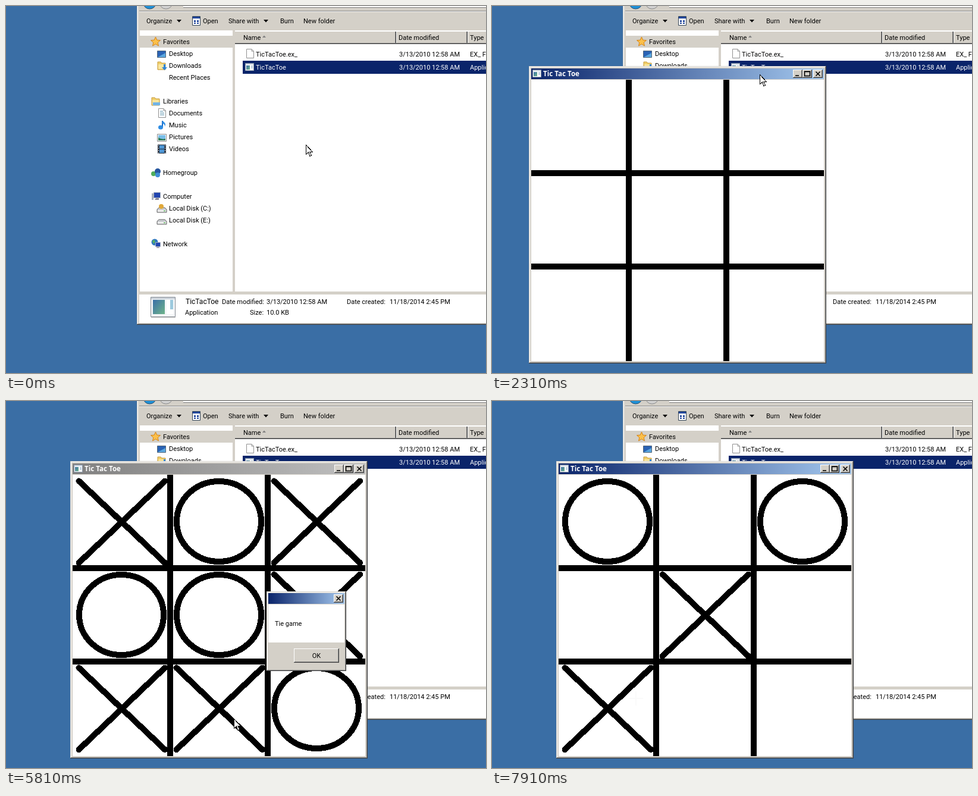
Animation, 807 px wide and 617 px high, one loop 8000 ms. Source, as an HTML page:

```html
<!DOCTYPE html>
<html lang="en">
<head>
<meta charset="utf-8">
<title>Noughts and crosses</title>
<style>
  html, body { margin: 0; width: 100%; height: 100%; overflow: hidden; background: #3a6ea5; }
  svg { display: block; width: 807px; height: 617px; }
  text { font: 11px Roboto, "Open Sans", sans-serif; white-space: pre; }
  .caption { font: bold 11.6px "Open Sans", "Noto Sans", sans-serif; fill: #fff; }
  .sharp { shape-rendering: crispEdges; }
  .mark { fill: none; stroke: #000; stroke-width: 10; stroke-linecap: round; shape-rendering: crispEdges; }
</style>
</head>
<body>
<svg viewBox="0 0 807 617">
  <defs>
    <linearGradient id="active"><stop stop-color="#0a246a"/><stop offset="1" stop-color="#a6caf0"/></linearGradient>
    <linearGradient id="inactive"><stop stop-color="#808080"/><stop offset="1" stop-color="#c0c0c0"/></linearGradient>
    <linearGradient id="pane" x2="1" y2="1"><stop stop-color="#3b6fa8"/><stop offset="1" stop-color="#6fb58a"/></linearGradient>
    <g id="app">
      <path d="M0 0H15V13H0Z" fill="#8a97a8"/><path d="M1 3H14V12H1Z" fill="#fff"/>
      <path d="M1 1H14V3H1Z" fill="#d5dde8"/><path d="M2 4H8V11H2Z" fill="url(#pane)"/>
      <path d="M10 4H13V9H10Z" fill="#c3d3e2"/>
    </g>
    <g id="page">
      <path d="M.5 .5H9L12.5 4V15.5H.5Z" fill="#fff" stroke="#909090"/><path d="M9 .5V4H12.5" fill="none" stroke="#909090"/>
    </g>
    <g id="screen">
      <path d="M.5 .5H14.5V11.5H.5Z" fill="#2a62b4" stroke="#567"/><path d="M1 11L14 4V11Z" fill="#5aa7df"/>
    </g>
    <g id="folder"><path d="M0 1H5L7 3H13V14H0Z" fill="#f0cf6a" stroke="#c79a3c"/><path d="M1 5H12V13H1Z" fill="#fae6a0"/></g>
    <g id="drive"><path d="M0 5L3 2H13L16 5V10H0Z" fill="#c9ccd0" stroke="#666"/><path d="M1 6H15V9H1Z" fill="#eee"/><path d="M11 7H14V8H11Z" fill="#3a3"/></g>
  </defs>

  <g id="explorer">
    <g class="sharp">
      <path d="M220 0H807V536H220Z" fill="#d4d0c8"/>
      <path d="M221 0H222V534H221Z" fill="#fff"/>
      <path d="M221 534H807V535H221Z" fill="#808080"/>
      <path d="M220 535H807V536H220Z" fill="#404040"/>
      <path d="M298 0H807V2H298Z" fill="#fff"/><path d="M298 2H807V3H298Z" fill="#808080"/>
      <path d="M224 8H807V9H224Z" fill="#808080"/><path d="M224 9H807V10H224Z" fill="#fff"/>
      <path d="M225 41H381V480H225ZM385 41H807V480H385ZM224 485H807V533H224Z" fill="#fff"/>
      <path d="M225 50H381V70H225ZM385 42H807V63H385Z" fill="#d4d0c8"/>
      <path d="M385 63H807V64H385ZM655 42H656V63H655ZM775 42H776V63H775Z" fill="#404040"/>
      <path d="M385 62H807V63H385ZM654 43H655V62H654ZM774 43H775V62H774Z" fill="#808080"/>
      <path d="M656 42H657V62H656ZM776 42H777V62H776ZM385 42H807V43H385Z" fill="#fff"/>
      <path d="M398 92H807V114H398Z" fill="#0a246a"/>
    </g>
    <g>
      <circle cx="241.500" cy="-6" r="11" fill="#1d8fd6" stroke="#35526f"/>
      <circle cx="269" cy="-6" r="11" fill="#d0d0d0" stroke="#8a8a8a"/>
      <path d="M287 23H295L291 27.500ZM433 23H441L437 27.500Z"/>
      <path d="M431 53L434 49.500L437 53Z" fill="#808080"/>
      <path d="M313.500 17.500H326.500V32.500H313.500Z" fill="#fff" stroke="#345"/>
      <path d="M314 18H326V21H314ZM316 24H319V27H316ZM321 24H324V27H321ZM316 28H319V30H316ZM321 28H324V30H321Z" fill="#24489c"/>
      <path d="M251.500 52L253.800 57.200L259.500 57.700L255.200 61.500L256.500 67L251.500 64L246.500 67L247.800 61.500L243.500 57.700L249.200 57.200Z" fill="#fbc04a" stroke="#d48216"/>
    </g>
    <use href="#screen" x="254" y="75"/>
    <use href="#folder" x="255" y="93"/>
    <path d="M265 98V103H262L266.500 108L271 103H268V98Z" fill="#2d85d8"/>
    <use href="#folder" x="245" y="153"/><path d="M247 162H259V167H247Z" fill="#72b4e6"/>
    <use href="#page" x="256" y="172"/><path d="M259 177H264M259 180H266M259 183H266" stroke="#4a88a5"/>
    <path d="M263 193V204" stroke="#1668c4" stroke-width="2"/><path d="M263 193Q270 197 267 203Q267 198 263 198Z" fill="#2f8de4"/><ellipse cx="260" cy="204" rx="4" ry="3.500" fill="#2f8de4"/>
    <path d="M254.500 215.500H269.500V227.500H254.500Z" fill="#fff" stroke="#888"/><path d="M256 217H268V226H256Z" fill="#79bde8"/><path d="M256 226V221Q262 225 268 223V226Z" fill="#2e7a57"/>
    <path d="M255 233H269V248H255Z" fill="#222c3c"/><path d="M258 234H266V240H258ZM258 241H266V247H258Z" fill="#4f96d4"/><path d="M256.500 234V248M267.500 234V248" stroke="#ddd" stroke-dasharray="2 2"/>
    <circle cx="248" cy="282" r="4" fill="#4fae5c"/><circle cx="255" cy="278" r="5" fill="#27579f"/><circle cx="255" cy="284" r="4" fill="#3f8ed8"/>
    <path d="M245 315H248V326H245Z" fill="#a8b0bd"/><path d="M248.500 313.500H259.500V322.500H248.500Z" fill="#2145b0" stroke="#a8b0bd"/><path d="M252 323H257V326H250Z" fill="#889"/>
    <use href="#drive" x="254" y="337"/><circle cx="261" cy="337" r="4" fill="#e0a83a"/>
    <use href="#drive" x="254" y="357"/>
    <circle cx="250" cy="397" r="5.500" fill="#2f78c0"/><path d="M246 395Q249 391 251 396L248 400Z" fill="#55b060"/><path d="M251.500 397.500H259.500V404.500H251.500Z" fill="#2145b0" stroke="#a8b0bd"/><path d="M253 406H258" stroke="#556"/>
    <use href="#page" x="404" y="72"/>
    <use href="#app" x="402" y="96"/>
    <g><path d="M243.500 489.500H284.500V522.500H243.500Z" fill="#f4f6f8" stroke="#858b92"/><path d="M244 490H284V493H244Z" fill="#cbd2da"/><path d="M247 494H267V518H247Z" fill="url(#pane)"/><path d="M270 494H281V518H270Z" fill="#fff"/><path d="M276 494H281V510H276Z" fill="#9cc9dd"/><path d="M244 523.500H285" stroke="#bbb"/></g>
  </g>

  <g id="game"></g>
  <g id="dialog"></g>
  <path id="arrow" class="sharp" d="M.5 .5V16.500L4.500 13L7 19.500L9.500 18.500L7 12.500H11.500Z" fill="#fff" stroke="#000"/>
  <path id="cross" class="sharp" d="M-12 0H12M0 -12V12" stroke="#fafafa" stroke-width="2"/>
</svg>
<script>
const LOOP = 8000, TICK = 70;
const $ = id => document.getElementById(id);

function add(parent, name, attrs, text) {
  const node = document.createElementNS('http://www.w3.org/2000/svg', name);
  for (const key in attrs) node.setAttribute(key, attrs[key]);
  if (text) node.textContent = text;
  return parent.appendChild(node);
}
const box = (parent, x, y, width, height, fill) =>
  add(parent, 'rect', { x, y, width, height, fill, class: 'sharp' });
const label = (parent, x, y, text, attrs) => add(parent, 'text', { x, y, ...attrs }, text);

const labels = [
  [236, 29, 'Organize'], [331, 29, 'Open'], [374, 29, 'Share with'], [461, 29, 'Burn'], [500, 29, 'New folder'],
  [264, 64, 'Favorites'], [274, 84, 'Desktop'], [274, 104, 'Downloads'], [274, 124, 'Recent Places'],
  [264, 164, 'Libraries'], [274, 184, 'Documents'], [274, 204, 'Music'], [274, 224, 'Pictures'], [274, 244, 'Videos'],
  [264, 284, 'Homegroup'], [264, 324, 'Computer'], [274, 344, 'Local Disk (C:)'], [274, 364, 'Local Disk (E:)'],
  [264, 404, 'Network'], [399, 57, 'Name'], [660, 57, 'Date modified'], [780, 57, 'Type'],
  [420, 85, 'TicTacToe.ex_'], [661, 85, '3/13/2010 12:58 AM'], [780, 85, 'EX_ File'],
  [363, 501, 'Date modified:'], [438, 501, '3/13/2010 12:58 AM'],
  [573, 501, 'Date created:'], [645, 501, '11/18/2014 2:45 PM'],
  [301, 519, 'Application'], [410, 519, 'Size:'], [438, 519, '10.0 KB']
];
const explorer = $('explorer');
labels.forEach(l => label(explorer, ...l));
[[420, 107, 'TicTacToe'], [661, 107, '3/13/2010 12:58 AM'], [780, 107, 'Application']]
  .forEach(l => label(explorer, ...l, { fill: '#fff' }));
label(explorer, 302, 501, 'TicTacToe', { style: 'font-size:12px' });

// Raised edge: dark outside right and bottom, light inside left and top.
function raised(parent, x, y, w, h, light = 0) {
  box(parent, x, y, w, h, '#404040');
  box(parent, x, y, w - 1, h - 1, light ? '#fff' : '#d4d0c8');
  box(parent, x + 1, y + 1, w - 2, h - 2, '#808080');
  box(parent, x + 1, y + 1, w - 3, h - 3, light ? '#d4d0c8' : '#fff');
  box(parent, x + 2, y + 2, w - 4, h - 4, '#d4d0c8');
}
function titleButton(parent, x, y, glyph) {
  raised(parent, x, y, 16, 14, 1);
  add(parent, 'path', { d: glyph, transform: `translate(${x} ${y})`, fill: 'none', stroke: '#000', 'stroke-width': 1.6 });
}
const CLOSE = 'M4.500 3.500L11.500 10.500M11.500 3.500L4.500 10.500';

const game = $('game');
raised(game, 0, 0, 500, 500);
const titleBar = box(game, 4, 4, 492, 18, 'url(#active)');
add(game, 'use', { href: '#app', x: 6, y: 6 });
label(game, 24, 17, 'Tic Tac Toe', { class: 'caption' });
titleButton(game, 444, 6, 'M4 10H10');
titleButton(game, 460, 6, 'M3.500 3H12.500V10.500H3.500ZM3 3.500H13');
titleButton(game, 478, 6, CLOSE);
box(game, 4, 23, 492, 473, '#fff');
[163, 327].forEach(x => box(game, x, 23, 10, 473, '#000'));
[175, 332].forEach(y => box(game, 4, y, 492, 10, '#000'));

// [kind, column, row, shown, cleared]
const marks = [
  ['X', 2, 0, 2800, 6580], ['O', 1, 1, 2800, 6580],
  ['X', 0, 2, 3710, 6580], ['O', 0, 1, 3710, 6580],
  ['X', 2, 1, 4130, 6580], ['O', 2, 2, 4130, 6580],
  ['X', 0, 0, 5180, 6580], ['O', 1, 0, 5180, 6580],
  ['X', 1, 2, 5810, 6580],
  ['X', 1, 1, 7280, LOOP], ['O', 0, 0, 7280, LOOP],
  ['X', 0, 2, 7910, LOOP], ['O', 2, 0, 7910, LOOP]
].map(([kind, col, row, from, to]) => {
  const place = { class: 'mark', transform: `translate(${col * 164} ${row * 157})` };
  const node = kind === 'X'
    ? add(game, 'path', { ...place, d: 'M14.500 33.500L159 171M159 33.500L14.500 171' })
    : add(game, 'ellipse', { ...place, cx: 86, cy: 101.5, rx: 71, ry: 67.5 });
  return { node, from, to };
});

const dialog = $('dialog');
raised(dialog, 438, 320, 134, 134);
box(dialog, 441, 323, 128, 18, 'url(#active)');
titleButton(dialog, 551, 325, CLOSE);
box(dialog, 441, 342, 128, 64, '#fff');
label(dialog, 452, 378, 'Tie game');
raised(dialog, 484, 416, 76, 24, 1);
label(dialog, 522, 432, 'OK', { 'text-anchor': 'middle' });

// [time, x, y, kind]; the pointer glides between neighbours of one kind.
const pointer = [
  [0, 504, 233, 'arrow'], [140, 504, 233, 'arrow'], [700, 464, 96, 'arrow'], [1050, 464, 96, 'arrow'], [1120, 462, 98, 'arrow'],
  [1190, 420, 150, 'cross'], [1400, 344, 130, 'cross'], [1470, 344, 118, 'cross'], [1680, 344, 112, 'cross'],
  [1820, 344, 107, 'arrow'], [1890, 344, 103, 'arrow'], [1960, 344, 103, 'arrow'], [2310, 450, 115, 'arrow'],
  [2450, 496, 115, 'arrow'], [2520, 496, 115, 'arrow'], [2590, 496, 114, 'arrow'],
  [2660, 497, 150, 'cross'], [2730, 497, 185, 'cross'], [2870, 497, 185, 'cross'], [3430, 288, 404, 'cross'],
  [3710, 202, 510, 'cross'], [4130, 500, 385, 'cross'], [4340, 422, 510, 'cross'], [4480, 422, 530, 'cross'],
  [4550, 426, 540, 'cross'], [4620, 418, 540, 'cross'], [4760, 360, 500, 'cross'], [4830, 358, 370, 'cross'],
  [4900, 345, 360, 'cross'], [4970, 278, 282, 'cross'], [5040, 235, 235, 'cross'], [5180, 235, 235, 'cross'],
  [5390, 340, 410, 'cross'], [5460, 383, 534, 'cross'],
  [5810, 383, 534, 'arrow'], [5950, 383, 534, 'arrow'], [6300, 522, 430, 'arrow'],
  [6440, 522, 430, 'cross'], [6510, 522, 430, 'cross'], [6860, 400, 360, 'cross'], [7420, 400, 360, 'cross'],
  [7840, 246, 492, 'cross'], [7910, 242, 500, 'cross']
];
function pointerAt(t) {
  const i = pointer.findLastIndex(p => p[0] <= t);
  const [t0, x0, y0, kind] = pointer[i];
  const [t1, x1, y1, nextKind] = pointer[i + 1] || pointer[i];
  const k = kind === nextKind && t1 > t0 ? (t - t0) / (t1 - t0) : 0;
  return { x: Math.round(x0 + (x1 - x0) * k), y: Math.round(y0 + (y1 - y0) * k), kind };
}

const show = (node, on) => node.setAttribute('visibility', on ? 'visible' : 'hidden');
const move = (node, x, y) => node.setAttribute('transform', `translate(${x} ${y})`);

function render(time) {
  const t = Math.floor((time % LOOP) / TICK) * TICK;
  const p = pointerAt(t);
  for (const kind of ['arrow', 'cross']) {
    show($(kind), p.kind === kind);
    move($(kind), p.x, p.y);
  }
  // While dragged, the window keeps its distance to the pointer.
  const grip = pointerAt(Math.min(Math.max(t, 1960), 2450));
  move(game, grip.x - 388, grip.y - 14);
  game.style.display = t >= 980 ? '' : 'none';
  marks.forEach(m => show(m.node, t >= m.from && t < m.to));

  const asking = t >= 5810 && t < 6440;
  dialog.style.display = asking ? '' : 'none';
  titleBar.setAttribute('fill', asking ? 'url(#inactive)' : 'url(#active)');
}

const start = performance.now();
function loop() {
  render(performance.now() - start);
  requestAnimationFrame(loop);
}
loop();
</script>
</body>
</html>
```
